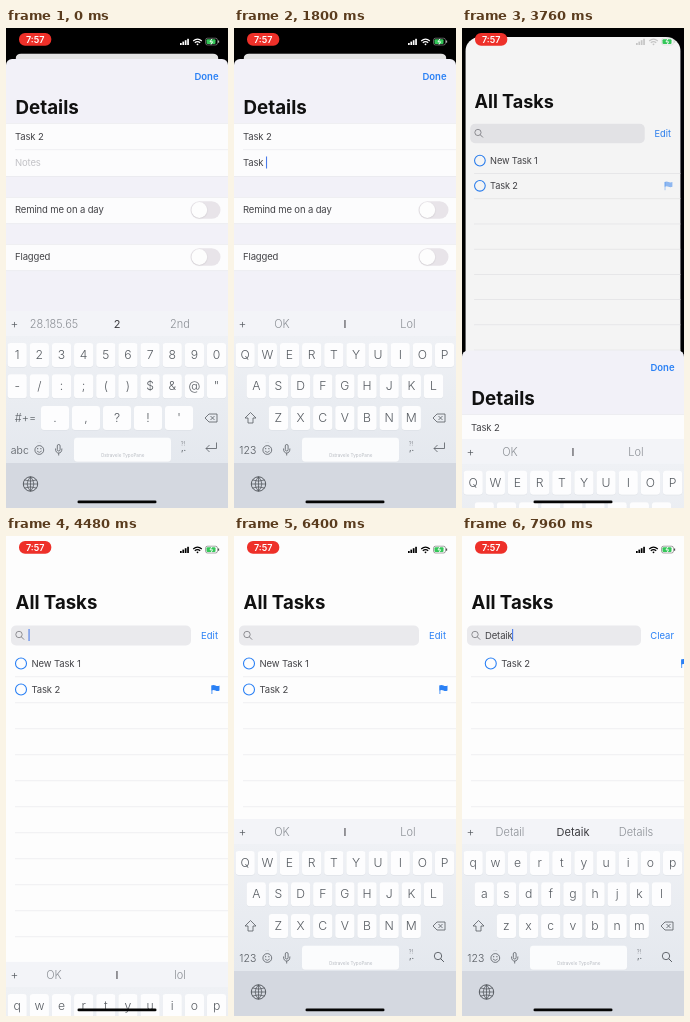
Animation, 222 px wide and 480 px high, one loop 8 s. Source, as an HTML page with a canvas:

```html
<!DOCTYPE html>
<html lang="en">
<head>
<meta charset="utf-8">
<title>Task details and search</title>
<style>
html, body { margin: 0; width: 100%; height: 100%; overflow: hidden; background: #000; }
canvas { display: block; width: 222px; height: 480px; }
</style>
</head>
<body>
<canvas id="stage"></canvas>
<script>
const W = 222, H = 480, LOOP = 8000;
const canvas = document.getElementById('stage');
const ctx = canvas.getContext('2d');
const ratio = window.devicePixelRatio || 1;
canvas.width = W * ratio;
canvas.height = H * ratio;

const BLUE = '#2a80f5', LINE = '#e8e8eb', INK = '#111', BODY_INK = '#434347', KEY_INK = '#565b61';
const NOTE = 'Task Detail', QUERY = 'Detaik';
const TIME = { notes: 760, note: 1080, flag: 2960, done: 3565, search: 4390, shift: 5080, query: 6780, miss: 7870 };

const clamp = v => Math.max(0, Math.min(1, v));
const spring = ms => ms <= 0 ? 0 : 1 - (1 + ms * .0113) * Math.exp(-ms * .0113);
const smooth = v => { v = clamp(v); return v * v * (3 - 2 * v); };
const typed = (word, t, start, step) => word.slice(0, t < start ? 0 : Math.floor((t - start) / step) + 1);
const blinkOn = ms => ms % 1060 < 530;

function text(str, x, y, { size = 9.5, weight = 400, color = INK, align = 'left', spacing = 0 } = {}) {
  ctx.font = `${weight} ${size}px Inter, sans-serif`;
  ctx.letterSpacing = spacing + 'px';
  ctx.textAlign = align;
  ctx.fillStyle = color;
  ctx.fillText(str, x, y);
  return ctx.measureText(str).width;
}

const body = (str, x, y, color = BODY_INK) => text(str, x, y, { color, spacing: -.14 });

function rect(x, y, w, h, color) {
  ctx.fillStyle = color;
  ctx.fillRect(x, y, w, h);
}

function box(x, y, w, h, r, color) {
  ctx.beginPath();
  ctx.roundRect(x, y, w, h, r);
  ctx.fillStyle = color;
  ctx.fill();
}

function stroke(path, color, width = 1) {
  ctx.strokeStyle = color;
  ctx.lineWidth = width;
  ctx.stroke(new Path2D(path));
}

function circle(x, y, r, color, width) {
  ctx.beginPath();
  ctx.arc(x, y, r, 0, Math.PI * 2);
  if (width) {
    ctx.strokeStyle = color;
    ctx.lineWidth = width;
    ctx.stroke();
  } else {
    ctx.fillStyle = color;
    ctx.fill();
  }
}

function shifted(x, y, draw) {
  ctx.save();
  ctx.translate(x, y);
  draw();
  ctx.restore();
}

function magnifier(x, y, r, color) {
  circle(x - 1, y - 1, r, color, .9);
  const e = r * .7 - 1;
  stroke(`M${x + e} ${y + e}l${r * .9} ${r * .9}`, color, 1);
}

const caret = (x, y) => rect(x, y, 1.1, 12, '#4a7bea');

function taskRow(name, x, y, flagAlpha) {
  circle(x + 15, y, 5.5, BLUE, 1.1);
  body(name, x + 25.5, y + 3.3);
  if (!flagAlpha) return;
  ctx.globalAlpha = flagAlpha;
  const fx = x + 205.5;
  stroke(`M${fx + .4} ${y - 4}v8.5`, BLUE, .8);
  ctx.fillStyle = BLUE;
  ctx.fill(new Path2D(`M${fx} ${y - 4}q2 -1 4 0t4 0v5q-2 1 -4 0t-4 0z`));
  ctx.globalAlpha = 1;
}

function listPage(t) {
  rect(0, 0, W, H, '#fdfdfd');
  text('All Tasks', 9.5, 73, { size: 18.6, weight: 700 });

  const query = typed(QUERY, t, TIME.query, 218);
  const fieldWidth = query ? 174 : 180;
  box(5, 89.5, fieldWidth, 20, 5, '#eaeaed');
  magnifier(14, 99.5, 3.2, '#85858a');
  const queryWidth = query ? body(query, 23, 102.7) : 0;
  if (t > TIME.search + 60 && (query || blinkOn(t - 4600))) caret(22.5 + queryWidth, 93);
  text(query ? 'Clear' : 'Edit', 212, 102.9, { color: BLUE, align: 'right' });

  for (let y = 141; y < H; y += 26) rect(9, y - .5, W - 9, .7, LINE);
  const leave = smooth((t - TIME.query) / 380);
  const miss = smooth((t - TIME.miss) / 600);
  taskRow('New Task 1', leave * W, 127.5, 0);
  const flagAlpha = t < TIME.flag ? 0 : clamp(.5 + (t - 3760) / 600);
  taskRow('Task 2', miss * W, 153.5 - 26 * leave, flagAlpha);
}

function toggle(y, on) {
  box(184.5, y - 8.8, 30, 17.6, 8.8, '#e8e4e9');
  ctx.globalAlpha = on;
  box(184.5, y - 8.8, 30, 17.6, 8.8, '#35c759');
  ctx.globalAlpha = 1;
  ctx.save();
  ctx.shadowColor = '#0002';
  ctx.shadowBlur = 1.5 * ratio;
  ctx.shadowOffsetY = .5 * ratio;
  circle(193.3 + on * 12.4, y, 7.9, '#fdfdfd');
  ctx.restore();
}

// Detail sheet, drawn with its top edge at y = 31
function sheet(t) {
  box(0, 31, W, H, [6, 6, 0, 0], '#f2f1f8');
  text('Done', 212.5, 51.9, { weight: 600, color: BLUE, align: 'right' });
  text('Details', 9.5, 86, { size: 18.8, weight: 700 });
  for (const [y, h] of [[95, 53], [169, 26.5], [216, 26.5]]) {
    rect(0, y, W, h, '#fcfcfd');
    rect(0, y, W, .6, LINE);
    rect(0, y + h, W, .6, LINE);
  }
  rect(9, 121.5, W, .6, LINE);
  const titleWidth = body('Task 2', 9, 111.8);
  const note = typed(NOTE, t, TIME.note, 150);
  const noteWidth = body(note || 'Notes', 9, 137.8, note ? BODY_INK : '#c2c2c6');
  if (t < TIME.notes) {
    if (!blinkOn(t)) caret(9 + titleWidth, 102.5);
  } else if (t < TIME.done && (t < 2900 || blinkOn(t - 2580))) {
    caret(note ? 9 + noteWidth : 9, 128.5);
  }
  body('Remind me on a day', 9, 185.3);
  body('Flagged', 9, 232.3);
  toggle(182, 0);
  toggle(229, smooth((t - TIME.flag) / 250));
}

const HINTS = {
  T: 'The T To', Ta: 'Take Ta Talk', Tas: 'Task Tas Taste', Task: 'Tasks Task Tasked',
  D: 'Do D Did', De: 'Dear De Deal', Det: 'Details Det Detail', Deta: 'Details Deta Detail',
  Detai: 'Details Detai Detail', Detail: 'Details Detail Detailed', Detaik: 'Detail Detaik Details'
};

function keyboardState(t) {
  if (t < TIME.notes) return { layout: 'digits', hints: '28.185.65 2 2nd' };
  const idle = { layout: 'upper', hints: 'OK I Lol' };
  let input = '';
  if (t < 3440) input = typed(NOTE, t, TIME.note, 150);
  else if (t > TIME.query) input = typed(QUERY, t, TIME.query, 218);
  else if (t > TIME.search && t < TIME.shift) return { layout: 'lower', hints: 'OK I lol' };
  const word = input.split(' ').pop();
  return word ? { layout: 'lower', hints: HINTS[word] } : idle;
}

function key(label, x, y, w = 19.2) {
  box(x - w / 2, y - 11.5, w, 24, 3, '#d9dde3');
  box(x - w / 2, y - 12, w, 24, 3, '#fdfdfe');
  text(label, x, y + 4, { size: 12.2, weight: 300, color: KEY_INK, align: 'center' });
}

const keyRow = (labels, x, y, pitch, w) =>
  [...labels].forEach((label, i) => key(label, x + i * pitch, y, w));

function keyboard(t) {
  const { layout, hints } = keyboardState(t);
  const digits = layout === 'digits';
  rect(0, 283, W, 27, '#f3f4f8');
  const shade = ctx.createLinearGradient(0, 308, 0, 435);
  shade.addColorStop(0, '#eff1f5');
  shade.addColorStop(1, '#e4e8ee');
  rect(0, 308, W, 127, shade);
  rect(0, 435, W, 45, '#d4d8e0');

  text('+', 8.5, 299.8, { size: 12, weight: 300, color: KEY_INK, align: 'center' });
  hints.split(' ').forEach((hint, i) => text(hint, 48 + i * 63, 299.8,
    { size: 11, weight: i === 1 ? 400 : 300, color: i === 1 ? '#3c3c40' : '#8b8f95', align: 'center' }));

  if (digits) {
    keyRow('1234567890', 11.2, 327, 22.15);
    keyRow('-/:;()$&@"', 11.2, 358.3, 22.15);
    text('#+=', 19.5, 394, { size: 11, weight: 300, color: KEY_INK, align: 'center' });
    keyRow(".,?!'", 49, 390, 31, 28);
  } else {
    const cased = row => layout === 'upper' ? row.toUpperCase() : row;
    keyRow(cased('qwertyuiop'), 11.2, 327, 22.15);
    keyRow(cased('asdfghjkl'), 22.3, 358.3, 22.15);
    keyRow(cased('zxcvbnm'), 44.4, 390, 22.15);
    stroke('M16.5 384.5l5.5 5.5h-3v5h-5v-5h-3z', KEY_INK, .8);
  }
  stroke('M203 386h8v8h-8l-4 -4zM204.5 388l4 4m0 -4l-4 4', KEY_INK, .8);

  text(digits ? 'abc' : '123', 13.8, 425.5, { size: 10.5, weight: 300, color: KEY_INK, align: 'center' });
  circle(33.3, 422, 4.4, KEY_INK, .8);
  circle(31.7, 420.7, .6, KEY_INK);
  circle(34.9, 420.7, .6, KEY_INK);
  stroke('M30.9 423q2.4 2.8 4.8 0', KEY_INK, .7);
  text('···', 33.3, 415.5, { size: 5, color: '#a2a6ac', align: 'center' });
  ctx.beginPath();
  ctx.roundRect(51.3, 416.5, 2.8, 6.5, 1.4);
  ctx.strokeStyle = KEY_INK;
  ctx.lineWidth = .8;
  ctx.stroke();
  stroke('M49.5 420.5q0 4.5 3.2 4.5t3.2 -4.5M52.7 425v2.5', KEY_INK, .8);
  box(68, 410.2, 97, 24, 3, '#d9dde3');
  box(68, 409.8, 97, 24, 3, '#fbfcfd');
  text('Ostravele TypoPane', 116.5, 428.5, { size: 4.6, color: '#b9bdc3', align: 'center' });
  text('?!', 177, 417.5, { size: 5.5, color: '#888c92', align: 'center' });
  text(',.', 177.5, 423, { size: 9, color: KEY_INK, align: 'center' });
  if (t > TIME.search) magnifier(205, 421, 3.7, KEY_INK);
  else stroke('M210.5 414.5v6h-10.5m3.5 -3.5l-3.5 3.5l3.5 3.5', KEY_INK, .8);

  circle(24.5, 456, 7.2, '#4a4e54', .9);
  stroke('M24.5 448.8v14.4M17.3 456h14.4M18.6 452q5.9 2.2 11.8 0M18.6 460q5.9 -2.2 11.8 0' +
    'M24.5 448.8q-6.6 7.2 0 14.4q6.6 -7.2 0 -14.4', '#4a4e54', .7);
}

function statusBar(open) {
  box(13, 5, 32.3, 12.8, 6, '#ee3029');
  text('7:57', 29.2, 14.8, { size: 9, weight: 600, color: '#fff', align: 'center' });
  const level = Math.round(255 * clamp(open * 2.2));
  const tone = `rgb(${level},${level},${level})`;
  for (let i = 0; i < 4; i++) rect(174 + i * 2.4, 15 - i * 1.4, 1.7, 2 + i * 1.4, tone);
  stroke('M187.2 13q4.3 -3.8 8.6 0M188.8 14.8q2.7 -2.3 5.4 0', tone, 1.2);
  circle(191.5, 16.3, .9, tone);
  ctx.globalAlpha = .5;
  ctx.beginPath();
  ctx.roundRect(199.5, 10.2, 12, 6.8, 2);
  ctx.strokeStyle = tone;
  ctx.lineWidth = .7;
  ctx.stroke();
  ctx.globalAlpha = 1;
  box(200.5, 11.2, 9, 4.8, 1, '#35c759');
  rect(212.3, 12.5, .8, 2.2, tone);
  stroke('M206 10.8l-2 3h2.6l-1.6 2.8', '#fff', .9);
}

function draw(t) {
  ctx.setTransform(ratio, 0, 0, ratio, 0, 0);
  const closing = spring(t - TIME.done);
  const open = t > TIME.search ? 0 : 1 - closing;
  const rising = spring(t - TIME.search);

  rect(0, 0, W, H, '#000');
  ctx.save();
  const scale = 1 - .086 * open;
  ctx.translate(W / 2 * (1 - scale), 25.5 * open);
  ctx.scale(scale, scale);
  ctx.beginPath();
  // The corners go from the screen's own rounding to the sheet's
  ctx.roundRect(0, 0, W, H * 1.1, clamp(open * 4) * (6 + 14 * closing));
  ctx.clip();
  listPage(t);
  rect(0, 0, W, H, `rgba(0,0,0,${.1 * open})`);
  ctx.restore();

  if (open > .001) shifted(0, 449 * closing, () => sheet(t));
  const drop = 197 * (t > TIME.search ? 1 - rising : closing);
  shifted(0, drop, () => keyboard(t));
  statusBar(open);
  box(71.5, 472.6, 79, 2.6, 1.3, '#050505');
}

function frame() {
  draw(performance.now() % LOOP);
  requestAnimationFrame(frame);
}
frame();
</script>
</body>
</html>
```
